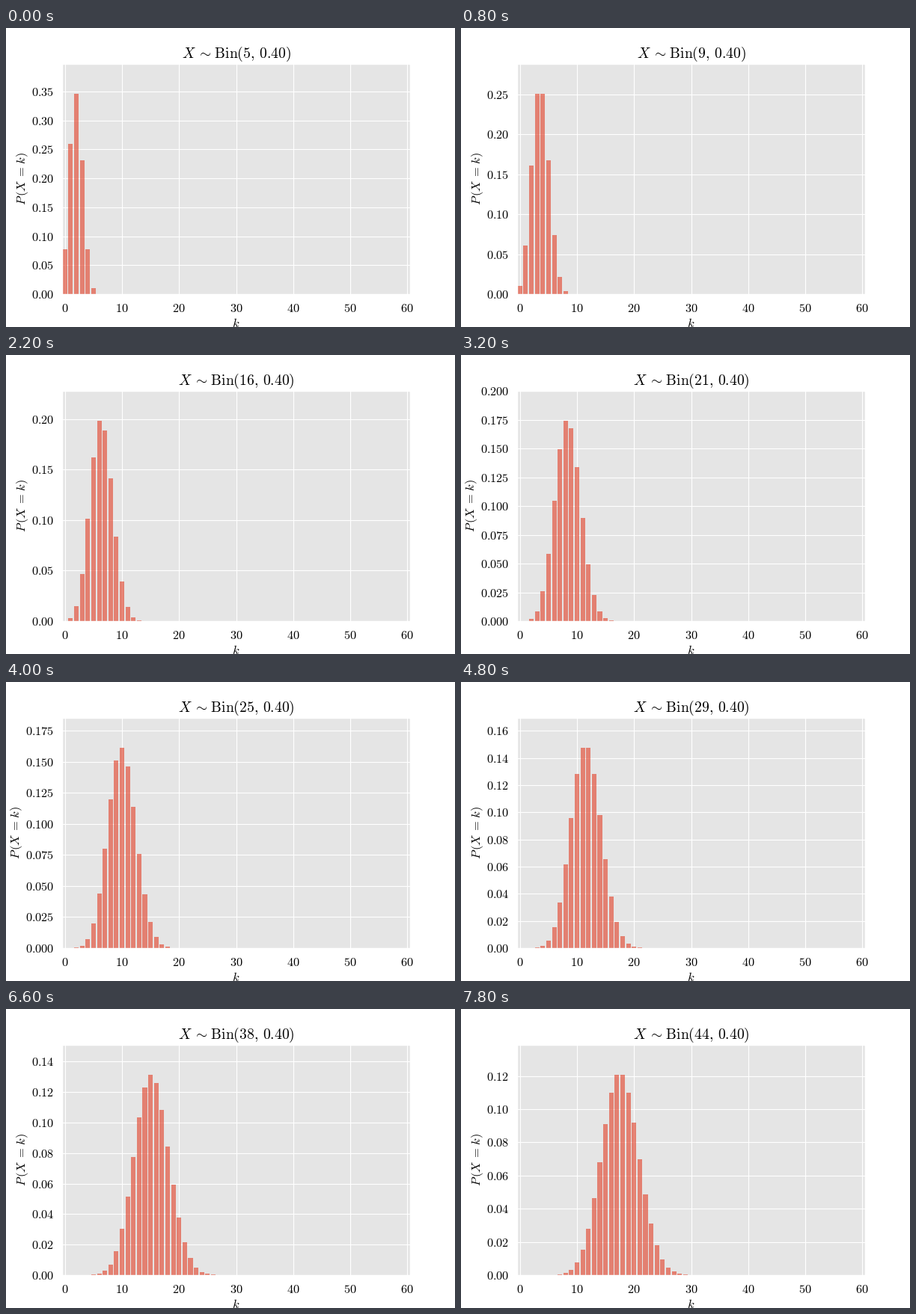
Write a matplotlib script that moves like this. It is 600 px wide and 400 px high and loops after 8000 ms.

```python
from math import comb

import matplotlib.pyplot as plt
from matplotlib.animation import FuncAnimation
from matplotlib.ticker import MaxNLocator

W, H = 600, 400
FRAMES, STEP_MS = 40, 200
FIRST_N, P, K_MAX = 5, 0.4, 60

plt.rcParams.update({
    "font.family": "Liberation Serif",
    "mathtext.fontset": "cm",
    "mathtext.default": "rm",
})

fig = plt.figure(figsize=(W / 100, H / 100), dpi=100, facecolor="white")
ax = fig.add_axes([0.125, 0.11, 0.775, 0.77], facecolor="#E5E5E5")
ax.set_axisbelow(True)
ax.grid(color="white", linewidth=0.8)
for spine in ax.spines.values():
    spine.set(color="white", linewidth=1)
ax.set_xlim(-0.5, K_MAX + 0.5)
ax.set_xticks(range(0, K_MAX + 1, 10), [])
ax.tick_params(length=0)
ax.tick_params(axis="y", pad=7.5, labelsize=11.75)


def put(x, y, text, size, **kw):
    """Place text with its baseline at a pixel position from the top left."""
    return fig.text(x / W, 1 - y / H, text, size=size, color="black",
                    ha="center", va="baseline", **kw)


def pmf(n, k):
    return comb(n, k) * P**k * (1 - P)**(n - k)


for k in range(0, K_MAX + 1, 10):
    x = 75 + 465 * (k + 0.5) / (K_MAX + 1)
    put(x, 380.4, rf"$\mathrm{{{k}}}$", 11.75)
put(307.5, 400, r"$\mathit{k}$", 11.8)

title = put(307.5, 39.8, "", 14.1)
ylabel = put(
    26.2, 202,
    r"$\mathit{P}\hspace{0.14}(\mathit{X}\hspace{0.2}=\hspace{0.12}\mathit{k})$",
    11.8, rotation=90, rotation_mode="anchor")

bars = ax.bar(range(K_MAX + 1), [0] * (K_MAX + 1), width=0.8,
              color="#E24A33", alpha=0.65, linewidth=0)
locator = MaxNLocator(nbins=9, steps=[1, 2, 2.5, 5, 10])


def draw(i):
    n = FIRST_N + i
    probs = [pmf(n, k) for k in range(K_MAX + 1)]
    top = 1.15 * max(probs)
    for bar, prob in zip(bars, probs):
        bar.set_height(prob)

    ticks = [t for t in locator.tick_values(0, top) if t <= top]
    digits = 3 if abs(ticks[1] - 0.025) < 1e-6 else 2
    ax.set_yticks(ticks, [rf"$\mathrm{{{t:.{digits}f}}}$" for t in ticks])
    ax.set_ylim(0, top)
    ylabel.set_x((26.2 if digits == 2 else 18) / W)
    title.set_text(
        r"$\mathit{X}\hspace{0.2}\sim\hspace{0.12}"
        rf"\mathrm{{Bin}}({n},\hspace{{0.18}}{P:.2f})$")
    return [*bars, title, ylabel]


anim = FuncAnimation(fig, draw, frames=FRAMES, interval=STEP_MS,
                     init_func=lambda: draw(0), repeat=True, repeat_delay=0,
                     blit=False)
plt.show()
```
